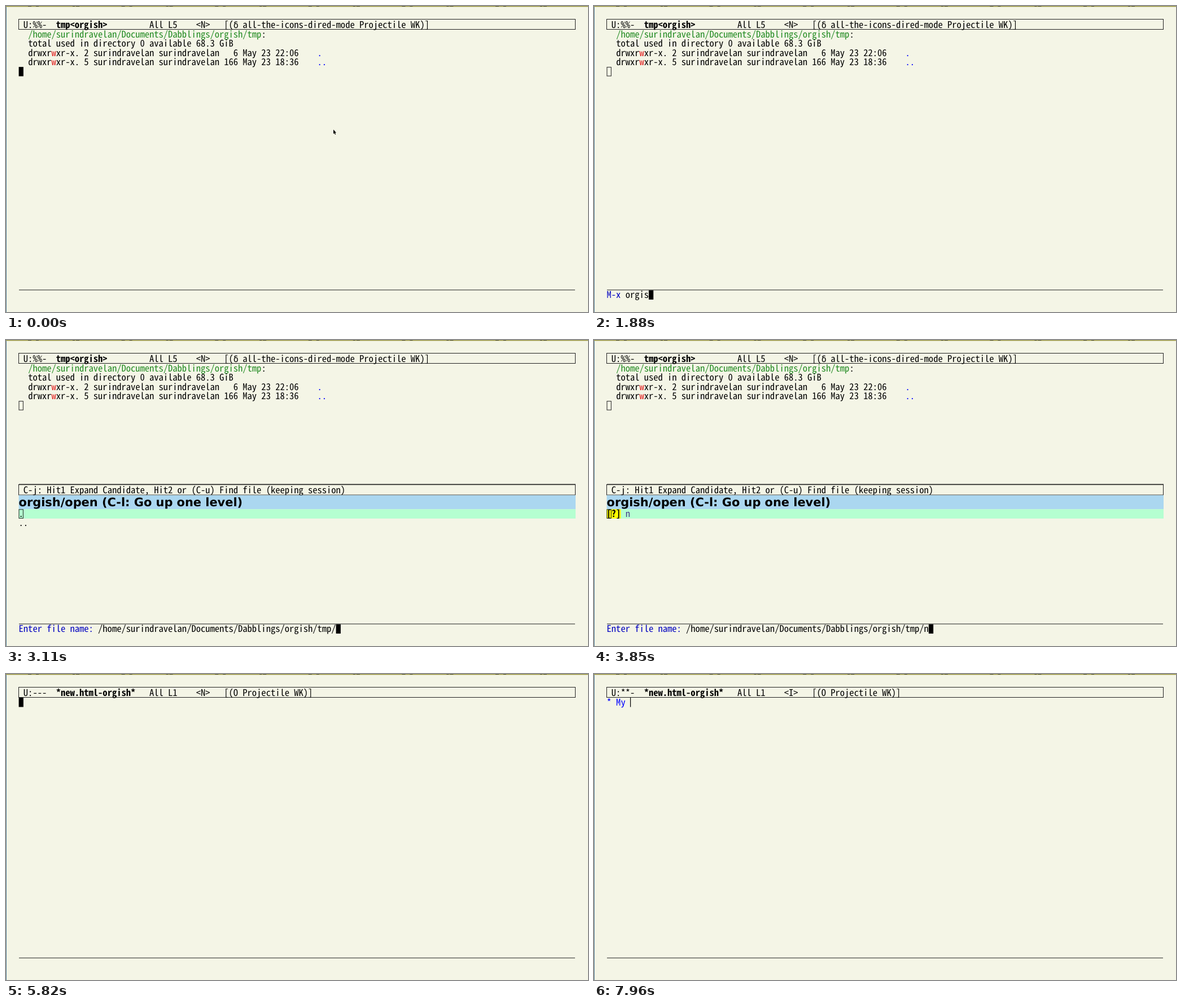
Write an HTML page that moves like this. It is 1031 px wide and 543 px high and loops after 8000 ms.

```html
<!DOCTYPE html>
<html lang="en">
<head>
<meta charset="utf-8">
<title>Editor session</title>
<style>
  html, body { margin: 0; width: 100%; height: 100%; overflow: hidden; background: #f4f5e6; }
  svg { display: block; width: 1031px; height: 543px; }
  text {
    font: 16.53px "Noto Sans Mono CJK JP", "Noto Sans Mono CJK SC", "Noto Sans Mono", monospace;
    white-space: pre;
    text-rendering: geometricPrecision;
    font-variant-ligatures: none;
  }
  .bold { font-weight: bold; }
  .greek { font: 15px "DejaVu Sans Mono", monospace; letter-spacing: 0; }
  .title { font: bold 20.9px "DejaVu Sans", sans-serif; letter-spacing: 0; }
</style>
</head>
<body>
<svg id="stage" viewBox="0 0 1031 543" xmlns="http://www.w3.org/2000/svg">
  <g id="frame"></g>
  <g id="screen"></g>
</svg>
<script>
const LOOP = 8000;
const LEFT = 22.6, ADV = 8.265, LINE = 16.53;
const TOP = 42, MINI = 504.4, ASCENT = 13.6;
const BG = '#f4f5e6', INK = '#000', BLUE = '#0000ff', PROMPT = '#0000c0', SLATE = '#483d8b';
const USER = 'surindravelan';
const DIR = `/home/${USER}/Documents/Dabblings/orgish/tmp`;
const ASK = 'Enter file name: ';

const colX = col => LEFT + col * ADV;
const rowY = row => TOP + row * LINE;
const esc = s => s.replace(/&/g, '&amp;').replace(/</g, '&lt;').replace(/>/g, '&gt;');

// Text on the character grid; y is the top of its cell.
const put = (col, y, str, fill = INK, cls = '') =>
  `<text class="${cls}" x="${colX(col)}" y="${y + ASCENT}" fill="${fill}">${esc(str)}</text>`;
const rect = (x, y, w, h, fill) =>
  `<rect x="${x}" y="${y}" width="${w}" height="${h}" fill="${fill}"/>`;
const box = (x, y, w, h) =>
  `<rect x="${x}" y="${y}" width="${w}" height="${h}" fill="none" stroke="#222"/>`;

function cursor(kind, col, y) {
  const x = colX(col);
  if (kind === 'block') return rect(x, y, ADV, LINE, INK);
  if (kind === 'hollow') return box(x + 0.4, y + 0.5, ADV - 0.9, LINE - 1);
  if (kind === 'bar') return rect(Math.round(x), y, 1.2, LINE, INK);
  return '';
}

function modeLine(flags, name, line, mode) {
  const y = 25;
  return put(1, y, 'U:' + flags) + put(8, y, name, INK, 'bold') +
    put(28, y, 'All ' + line) + put(38, y, mode) + put(44, y, '[(');
}

function dired(s) {
  const entry = (row, links, size, time, name) => {
    const y = rowY(row);
    return put(2, y, 'drwxr') + put(7, y, 'w', '#e01b1b') +
      put(8, y, `xr-x. ${links} ${USER} ${USER} ${size.padStart(3)} May 23 ${time}`) +
      put(64, y, name, BLUE);
  };
  return modeLine('%%-', 'tmp<orgish>', 'L5', '<N>') +
    put(46, 25, 'δ', INK, 'greek') + put(48, 25, 'all-the-icons-dired-mode Projectile WK)]') +
    put(2, rowY(0), DIR, '#228b22') + put(2 + DIR.length, rowY(0), ':') +
    put(2, rowY(1), 'total used in directory 0 available 68.3 GiB') +
    entry(2, 2, '6', '22:06', '.') + entry(3, 5, '166', '18:36', '..') +
    cursor(s.main, 0, rowY(4));
}

function heading(s) {
  return modeLine(s.text ? '**-' : '---', '*new.html-orgish*', 'L1', s.mode) +
    put(46, 25, 'O Projectile WK)]') +
    put(0, rowY(0), s.text, BLUE) + cursor(s.main, s.text.length, rowY(0));
}

function picker(s) {
  const y = 300.3;
  let out = rect(23, 255.6, 986, 1.6, INK) + box(22.5, 256.5, 986, 18.5) +
    put(1, 258.8, 'C-j: Hit1 Expand Candidate, Hit2 or (C-u) Find file (keeping session)') +
    rect(22.6, 275.5, 986.4, 24.8, '#abd7f0') +
    `<text class="title" x="${LEFT}" y="295.2">orgish/open (C-l: Go up one level)</text>` +
    rect(22.6, y, 986.4, LINE, '#b5ffd1');
  if (s.pick) {
    const [stem, ext] = s.pick.split('.');
    const dot = s.pick.includes('.') ? '.' : '';
    out += rect(LEFT, y, ADV * 3, LINE, '#ffff00') + put(0, y, '[?]', INK, 'bold') +
      put(4, y, stem + dot, SLATE) + put(5 + stem.length, y, ext || '', '#f012e0');
  } else {
    out += put(0, y, '.') + put(0, y + LINE, '..');
  }
  return out + cursor('hollow', 0, y);
}

function miniBuffer(s) {
  let out = put(0, MINI, s.prompt, PROMPT) + put(s.prompt.length, MINI, s.input);
  if (s.at !== null) {
    out += cursor('block', s.at, MINI);
    const under = (s.prompt + s.input)[s.at];
    if (under) out += put(s.at, MINI, under, BG);
  }
  return out;
}

const pointer = '<path d="M580 219.3v7.6l1.7-1.5 1.3 2.9 1.2-.6-1.3-2.7h2.1z"/>';

const draw = s => (s.view === 'dired' ? dired(s) : heading(s)) +
  (s.picking ? picker(s) : '') + (s.mouse ? pointer : '') + miniBuffer(s);

const command = input => ({ prompt: 'M-x ', input, at: 4 + input.length });
const file = name => ({ prompt: ASK, input: `${DIR}/${name}`, at: ASK.length + DIR.length + 1 + name.length });
const named = (name, pick = name) => ({ ...file(name), pick });
const write = text => ({ text, main: 'bar', input: '' });

// Each step changes part of the state from its time on.
const steps = [
  [0, { view: 'dired', main: 'block', mouse: true, picking: false, pick: '',
        prompt: '', input: '', at: null, text: '', mode: '<N>' }],
  [340, { main: 'none' }],
  [660, { main: 'hollow', ...command('') }],
  [1160, { at: null }],
  [1240, { mouse: false, ...command('o') }],
  [1320, command('or')],
  [1490, command('org')],
  [1560, command('orgi')],
  [1880, command('orgis')],
  [2040, command('orgish/open')],
  [2540, { at: null }],
  [2870, { at: 0 }],
  [3110, { picking: true, ...file('') }],
  [3610, { at: null }],
  [3850, named('n')],
  [4010, named('ne')],
  [4170, named('new')],
  [4670, named('new.')],
  [5000, named('new.h', 'new.')],
  [5240, named('new.htm')],
  [5320, named('new.html')],
  [5820, { view: 'heading', main: 'block', picking: false, prompt: '', input: '', at: null }],
  [6310, { main: 'none' }],
  [6640, { main: 'bar', mode: '<I>', input: '-- INSERT --' }],
  [6980, write('* ')],
  [7470, { main: 'none' }],
  [7630, write('* M')],
  [7880, write('* My')],
  [7960, write('* My ')]
];

let state = {};
const scenes = steps.map(([time, change]) => {
  state = { ...state, ...change };
  return { time, svg: draw(state) };
});

function drawFrame() {
  let out = rect(0, 0, 1031, 1.4, '#96913a') + rect(0, 1.4, 1, 542, '#54809a');
  for (let k = 0; k < 6; k++) {
    const x = 39 + k * 165.6;
    out += [[0, 6], [14, 5], [79, 4], [85, 6]].map(([dx, w]) => rect(x + dx, 0, w, 0.9, '#3c3a18')).join('');
  }
  return out + box(22.5, 23.5, 986, 18) + rect(23, 503.4, 985, 1, '#222');
}

const screen = document.getElementById('screen');
document.getElementById('frame').innerHTML = drawFrame();

// Bring the installed font's advance onto the grid.
screen.innerHTML = put(0, 0, 'M'.repeat(50));
const advance = screen.firstChild.getComputedTextLength() / 50;
screen.style.letterSpacing = `${(ADV - advance).toFixed(3)}px`;

let shown = null;
const start = performance.now();
function tick() {
  const t = Math.max(0, performance.now() - start) % LOOP;
  const scene = scenes.filter(s => s.time <= t).pop();
  if (scene !== shown) {
    shown = scene;
    screen.innerHTML = scene.svg;
  }
  requestAnimationFrame(tick);
}
tick();
</script>
</body>
</html>
```
